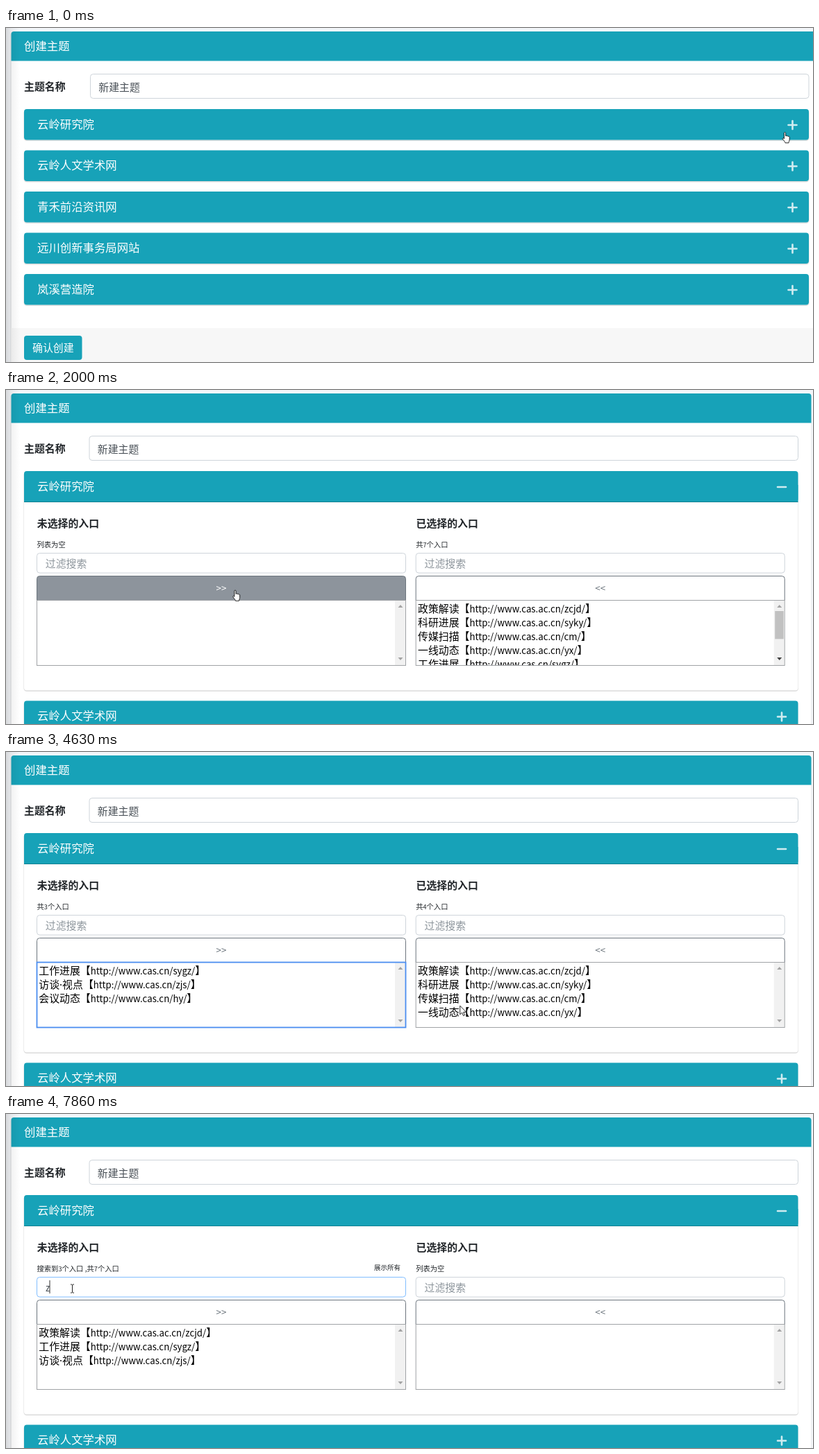
These frames come from a looping animation (1162 by 482 pixels, 8 s). An HTML page:

```html
<!DOCTYPE html>
<html lang="zh-CN">
<head>
<meta charset="utf-8">
<title>创建主题</title>
<style>
  html, body { margin: 0; width: 100%; height: 100%; overflow: hidden; background: #f4f6f9; }
  svg { display: block; width: 100%; height: 100%; }
  text { font-family: "Noto Sans CJK SC", "Noto Sans CJK", sans-serif; white-space: pre; }
  .dot { font-family: "Noto Sans", sans-serif; }
</style>
</head>
<body>
<svg id="stage" viewBox="0 0 1162 482" xmlns="http://www.w3.org/2000/svg"></svg>
<script>
const LOOP = 8000, TEAL = '#17a2b8', INK = '#212529', ROW = 20.2;
const OPEN_AT = 668, OPEN_MS = 500, OPEN_H = 272;
const DRAG = [3470, 4050], FOCUS_RIGHT = 4820, FOCUS_INPUT = 6480, TYPED = 7690, FILTERED = 7860;

const sites = ['云岭研究院', '云岭人文学术网', '青禾前沿资讯网', '远川创新事务局网站', '岚溪营造院'];
const entries = [
  ['政策解读', 'http://www.cas.ac.cn/zcjd/'],
  ['科研进展', 'http://www.cas.ac.cn/syky/'],
  ['传媒扫描', 'http://www.cas.ac.cn/cm/'],
  ['一线动态', 'http://www.cas.ac.cn/yx/'],
  ['工作进展', 'http://www.cas.cn/sygz/'],
  ['访谈·视点', 'http://www.cas.cn/zjs/'],
  ['会议动态', 'http://www.cas.cn/hy/']
];

// How many leading entries sit in the right list from a given time on
const moves = [[0, 0], [1900, 7], [2850, 0], [4050, 4], [4860, 3], [5090, 2], [5280, 1], [5700, 0]];
const clicks = [670, 1900, 2850, 4860, 5090, 5280, 5700];

// Pointer hot spot: time, x, y
const path = [
  [70, 1121.5, 150.5], [460, 1137.3, 139], [860, 1137.3, 139],
  [1140, 785, 211.5], [1165, 785, 211.5], [1380, 640, 245], [1750, 330, 289], [2000, 330, 289],
  [2300, 600, 292], [2600, 780.5, 294], [2900, 780.5, 294], [3090, 700, 303],
  [3400, 225, 374], [3500, 225, 374], [3740, 219.5, 330], [3830, 219.5, 330],
  [3950, 219, 314], [4060, 219, 314], [4780, 727, 375], [4870, 727, 375],
  [5020, 726, 355], [5100, 726, 355], [5210, 724.5, 337], [5330, 724.5, 337],
  [5470, 720, 316], [5800, 720, 316], [6480, 400, 246], [6789, 400, 246], [6790, 95.5, 252]
];

const shapes = {
  arrow: '<path d="M0 0V12.6L2.9 9.9 4.8 14.4 6.8 13.5 5 9.2H9Z" fill="#fff" stroke="#111" stroke-width=".9"/>',
  hand: '<path transform="translate(-4.1 -.7)" d="M3 10V1.8a1.1 1.1 0 0 1 2.2 0V6c.3-.8 1.9-.7 2 .3c.4-.6 1.8-.5 1.9.5' +
    'c.5-.5 1.7-.2 1.7.8V11c0 2-1 2.6-1.2 5H4.6C4.2 14 2.4 12.6.9 10.4C.2 9.2 1.6 8.3 3 10Z" fill="#fff" stroke="#111" stroke-width=".9"/>',
  beam: '<path d="M-2.5-6H-.8L0-5.4.8-6H2.5M0-5.4V5.4M-2.5 6H-.8L0 5.4.8 6H2.5" fill="none" stroke="#222"/>'
};

const between = (v, a, b) => v >= a && v < b;
const lat = s => `<tspan font-size=".89em">${s}</tspan>`;
const latDigits = s => s.replace(/\d/g, lat);
const text = (x, y, size, s, fill = INK, extra = '') =>
  `<text x="${x}" y="${y}" font-size="${size}" fill="${fill}" ${extra}>${s}</text>`;
const rect = (x, y, w, h, fill, extra = '') =>
  `<rect x="${x}" y="${y}" width="${w}" height="${h}" fill="${fill}" ${extra}/>`;
const bold = 'font-weight="700"';

function pointerAt(t) {
  const q = t < 5860 ? 609 + Math.floor((t - 609) / 76.9) * 76.9 : t;
  let i = path.findIndex(k => k[0] > q);
  if (i === 0) return path[0].slice(1);
  if (i < 0) return path[path.length - 1].slice(1);
  const [t0, x0, y0] = path[i - 1], [t1, x1, y1] = path[i];
  const p = (q - t0) / (t1 - t0), e = p * p * (3 - 2 * p);
  return [x0 + (x1 - x0) * e, y0 + (y1 - y0) * e];
}

function pointerKind(t, x, y) {
  if (t < 1000) return 'hand';
  const inColumn = between(x, 45, 576) || between(x, 590, 1122);
  if (inColumn && between(y, 235, 264)) return 'beam';
  return inColumn && between(y, 268, 304) ? 'hand' : 'arrow';
}

function card(i, y, right, bodyH, open, hover) {
  const cx = right - 23.5, cy = y + 23;
  let s = rect(25.5, y + 1, right - 25, 45 + bodyH, '#000', 'rx="4.5" opacity=".14"');
  s += rect(26, y, right - 26, 44.5 + bodyH, '#fff', 'rx="4"');
  s += rect(26, y, right - 26, 44.5, TEAL, 'rx="4"');
  if (open) s += rect(26, y + 20, right - 26, 24.5, TEAL) + rect(26, y + 44, right - 26, 1, '#128293');
  s += text(45, y + 27.5, 16.4, sites[i], '#fff');
  const bars = `M${cx - 6} ${cy}h12` + (open ? '' : `M${cx} ${cy - 6}v12`);
  return s + `<path d="${bars}" stroke="#fff" stroke-width="2.6" stroke-linecap="round" opacity="${hover ? 1 : .8}"/>`;
}

function list(x, items, focus, selected) {
  const clip = x < 500 ? 'leftList' : 'rightList', full = items.length * ROW > 92;
  let s = rect(x, 303.5, 531, 94, '#fff');
  s += rect(x + 515.5, 304, 15, 93, '#f1f1f1');
  if (full) s += rect(x + 517, 319, 12.5, 62 * 92 / (items.length * ROW), '#c1c1c1');
  s += `<path d="M${x + 520} 314l3.5-4 3.5 4z" fill="#a3a3a3"/>`;
  s += `<path d="M${x + 520} 386l3.5 4 3.5-4z" fill="${full ? '#404040' : '#a3a3a3'}"/>`;
  s += `<g clip-path="url(#${clip})">`;
  items.forEach(([name, url], i) => {
    const on = selected(i), y = 304.5 + i * ROW;
    if (on) s += rect(x + 1.5, y, 513.5, ROW + .3, '#1e90ff');
    const label = name.replace('·', '<tspan class="dot">·</tspan>');
    s += text(x + 2.8, y + 16, 14.9, `${label}【${lat(url)}】`, on ? '#fff' : '#000');
  });
  return s + '</g>' + rect(x, 303.5, 531, 94, 'none',
    focus ? 'stroke="#4a8df0" stroke-width="1.8"' : 'stroke="#a0a3a6"');
}

function column(x, o) {
  let s = text(x + .3, 197.5, 14.9, o.title, INK, bold);
  s += text(x, 227, 10.3, latDigits(o.info));
  if (o.showAll) s += text(530, 224.5, 9.5, '展示所有');
  s += rect(x, 235.5, 531, 28.5, '#fff', `rx="4" stroke="${o.inputFocus ? '#80bdff' : '#ced4da'}"`);
  s += o.typed ? text(x + 12.5, 255.5, 14.9, lat('z'), '#495057')
               : text(x + 12.3, 255.5, 14.9, '过滤搜索', '#8d959c');
  if (o.caret) s += rect(o.typed ? 62.5 : 56, 240, 1, 19, '#333');
  s += `<path d="M${x} 303.5v-31a4 4 0 0 1 4-4h523a4 4 0 0 1 4 4v31z" fill="${o.hover ? '#8d949c' : '#fff'}" stroke="#6c757d"/>`;
  s += text(x + 265.5, 290.5, 13.4, o.sign, o.hover ? '#fff' : '#6c757d', 'text-anchor="middle"');
  return s + list(x, o.items, o.listFocus, o.selected);
}

function columns(t, px, py, kind) {
  const n = moves.filter(m => m[0] <= t).pop()[1];
  const filtered = t >= FILTERED;
  const right = entries.slice(0, n);
  const left = filtered ? entries.filter(e => e[1].includes('z')) : entries.slice(n);
  const info = k => k ? `共${k}个入口` : '列表为空';
  const dragging = between(t, ...DRAG), top = Math.floor((py - 304.5) / ROW);
  const onButton = kind === 'hand' && t > 1000;
  const caret = between(t, 6790, 7000) || t >= 7460;
  return column(44.5, {
    title: '未选择的入口', sign: '&gt;&gt;', items: left,
    info: filtered ? `搜索到${left.length}个入口 ,共7个入口` : info(left.length),
    showAll: filtered, typed: t >= TYPED, caret, inputFocus: t >= FOCUS_INPUT,
    hover: onButton && px < 580, listFocus: between(t, DRAG[0], FOCUS_RIGHT),
    selected: i => dragging && i >= top && i <= 3
  }) + column(590.2, {
    title: '已选择的入口', sign: '&lt;&lt;', items: right, info: info(n),
    hover: onButton && px > 580, listFocus: between(t, FOCUS_RIGHT, FOCUS_INPUT),
    selected: () => false
  });
}

function scene(t) {
  const p = Math.min(1, Math.max(0, (t - OPEN_AT) / OPEN_MS));
  const e = .5 - Math.cos(Math.PI * p) / 2, h = OPEN_H * e;
  const open = t >= OPEN_AT, narrow = e > .02;
  const right = narrow ? 1140.5 : 1156, edge = narrow ? 1159.5 : 1175, inputX = narrow ? 120 : 121.5;
  const [px, py] = pointerAt(t), kind = pointerKind(t, px, py);

  let s = `<defs>
    <linearGradient id="shade"><stop stop-opacity=".12"/><stop offset=".4" stop-opacity=".05"/><stop offset="1" stop-opacity="0"/></linearGradient>
    <clipPath id="body"><rect x="26" y="162" width="1115" height="${h}"/></clipPath>
    <clipPath id="leftList"><rect x="45" y="304" width="515" height="93"/></clipPath>
    <clipPath id="rightList"><rect x="590.7" y="304" width="515" height="93"/></clipPath>
  </defs>`;
  s += rect(0, 0, 1162, 482, '#f4f6f9');
  s += rect(6.5, 5.5, edge - 6, 500, '#000', 'rx="4.5" opacity=".12"');
  s += rect(7.5, 5, edge - 7.5, 500, '#fff', 'rx="4"');
  s += `<path d="M7.5 47.5V9a4 4 0 0 1 4-4H${edge - 4}a4 4 0 0 1 4 4V47.5z" fill="${TEAL}"/>`;
  s += text(26, 32.3, 16.4, '创建主题', '#fff');
  s += text(26, 90, 14.9, '主题名称', INK, bold);
  s += rect(inputX, 66.5, right - inputX, 35, '#fff', 'rx="4" stroke="#ced4da"');
  s += text(inputX + 11.8, 90.5, 14.9, '新建主题', '#495057');

  s += rect(7.5, 433 + h, edge - 7.5, 60, '#f7f7f7');
  s += rect(26, 444 + h, 83.5, 35, TEAL, 'rx="4"');
  s += text(38, 466.7 + h, 14.9, '确认创建', '#fff');

  sites.forEach((_, i) => {
    const hover = !i && !narrow && px > 1121 && py < 150;
    s += card(i, 117 + i * 59.5 + (i ? h : 0), right, i ? 0 : h, !i && open, hover);
  });
  if (open) {
    s += `<g clip-path="url(#body)"><g transform="translate(0 ${20 * (e - 1)})">${columns(t, px, py, kind)}</g></g>`;
  }
  s += rect(0, 0, 20, 482, 'url(#shade)');

  if (between(t, ...DRAG) || clicks.some(c => between(t, c - 60, c))) {
    s += `<circle cx="${px}" cy="${py + 1}" r="11" fill="#f0e61e" opacity=".6"/>`;
  }
  return s + `<g transform="translate(${px} ${py})">${shapes[kind]}</g>`;
}

const stage = document.getElementById('stage');
const start = performance.now();
let last = '';
function draw(now) {
  const next = scene(Math.max(0, now - start) % LOOP);
  if (next !== last) stage.innerHTML = last = next;
  requestAnimationFrame(draw);
}
draw(start);
</script>
</body>
</html>
```
